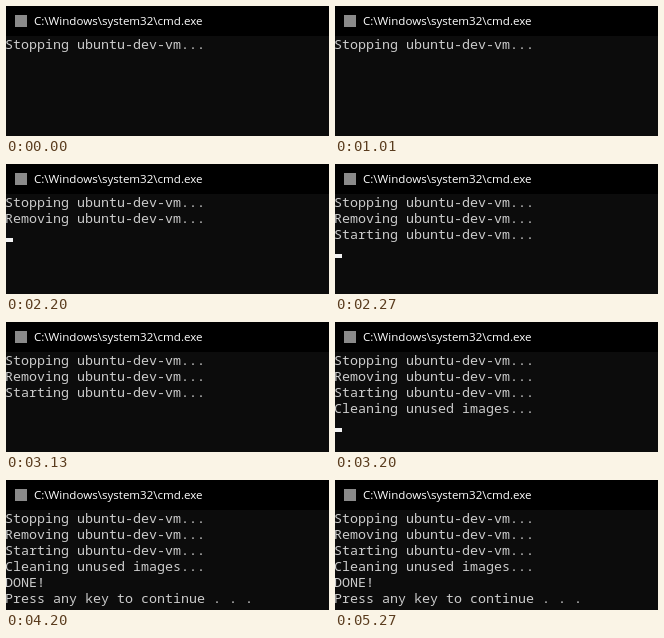
An HTML page that plays this animation: 323 by 130 pixels, repeating every 5.8 s.

```html
<!DOCTYPE html>
<html lang="en">
<head>
<meta charset="utf-8">
<title>Console</title>
<style>
  html, body { margin: 0; width: 100%; height: 100%; overflow: hidden; background: #0c0c0c; }
  svg { display: block; width: 323px; height: 130px; }
  .title { font: 11.57px "Open Sans", "Noto Sans", sans-serif; fill: #fff; }
  .line { font: 500 13.334px "Noto Sans Mono", "DejaVu Sans Mono", monospace; fill: #ccc; white-space: pre; }
</style>
</head>
<body>
<svg viewBox="0 0 323 130">
  <rect width="323" height="130" fill="#0c0c0c"/>
  <rect width="323" height="30" fill="#000"/>
  <rect x="9" y="9" width="12" height="12" fill="#8a8a8a"/>
  <text class="title" x="28" y="19">C:\Windows\system32\cmd.exe</text>
  <g id="output"></g>
  <rect id="cursor" width="8" height="4" fill="#f2f2f2"/>
</svg>
<script>
const LOOP = 5800;
const CELL = { left: -1, top: 30, width: 8, height: 16, baseline: 13 };
const LINES = [
  "Stopping ubuntu-dev-vm...",
  "Removing ubuntu-dev-vm...",
  "Starting ubuntu-dev-vm...",
  "Cleaning unused images...",
  "DONE!",
  "Press any key to continue . . . "
];

// Each step: start time in ms, printed lines, cursor visible.
const STEPS = [
  [0, 1, false], [530, 1, true], [1010, 1, false], [1540, 1, true], [2070, 1, false],
  [2200, 2, true], [2270, 3, true], [3130, 3, false], [3200, 4, true],
  [3270, 6, true], [4200, 6, false], [4730, 6, true], [5270, 6, false]
];

const output = document.getElementById("output");
const cursor = document.getElementById("cursor");

const rows = LINES.map((content, row) => {
  const text = document.createElementNS("http://www.w3.org/2000/svg", "text");
  text.setAttribute("class", "line");
  text.setAttribute("x", CELL.left);
  text.setAttribute("y", CELL.top + row * CELL.height + CELL.baseline);
  text.textContent = content;
  output.append(text);
  return text;
});

const show = (element, visible) =>
  element.setAttribute("visibility", visible ? "visible" : "hidden");

function draw(time) {
  const [, printed, cursorOn] = STEPS.findLast(([start]) => start <= time);
  rows.forEach((text, row) => show(text, row < printed));

  // The prompt keeps the cursor on its own line; other lines end with a break.
  const atPrompt = printed === LINES.length;
  const row = atPrompt ? printed - 1 : printed;
  const column = atPrompt ? LINES[row].length : 0;
  cursor.setAttribute("x", CELL.left + column * CELL.width);
  cursor.setAttribute("y", CELL.top + (row + 1) * CELL.height - 4);
  show(cursor, cursorOn);
}

const begin = performance.now();
function tick() {
  draw((performance.now() - begin) % LOOP);
  requestAnimationFrame(tick);
}
tick();
</script>
</body>
</html>
```
